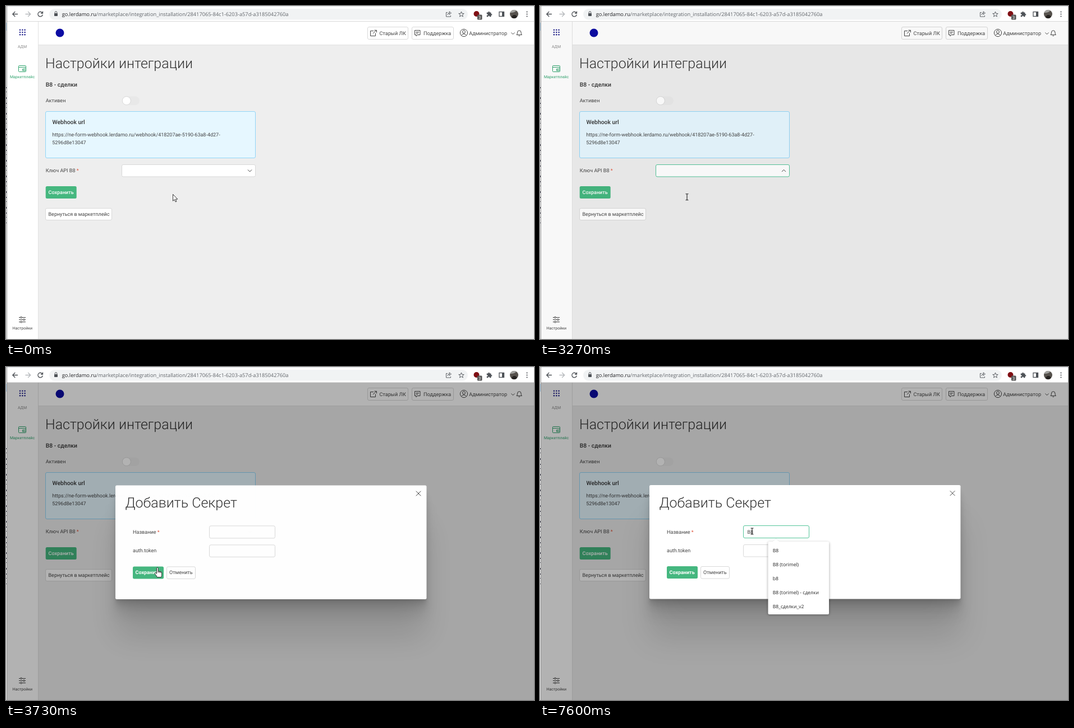
Write an HTML page that moves like this. It is 941 px wide and 595 px high and loops after 8000 ms.

```html
<!DOCTYPE html>
<html lang="ru">
<head>
<meta charset="utf-8">
<title>Настройки интеграции</title>
<style>
html, body { margin: 0; width: 100%; height: 100%; overflow: hidden; background: #fff; }
svg { display: block; width: 941px; height: 595px; font: 9px Roboto, sans-serif; text-rendering: geometricPrecision; }
text { fill: #444; }
.line { fill: none; stroke: #444; stroke-width: 1; }
.chrome { fill: none; stroke: #4d5156; stroke-width: 1.3; }
.box { fill: #fff; stroke: #d9d9d9; }
.head { font-size: 9.15px; }
.label { font-size: 9.1px; }
.title { font-size: 25px; font-weight: 300; fill: #333; }
.sub { font-size: 10.4px; font-weight: 500; fill: #333; }
.tiny { font-size: 7px; text-anchor: middle; }
.ui { font-family: "Open Sans", "Noto Sans", sans-serif; }
.url { font-size: 9.26px; }
.hint { font-size: 8.55px; fill: #222; }
.green { fill: #45b77f; }
.white { fill: #fff; font-weight: 500; }
.star { fill: #e0553c; }
</style>
</head>
<body>
<svg viewBox="0 0 941 595">
  <!-- page -->
  <rect x="2" y="28" width="939" height="567" fill="#eee"/>
  <rect x="2" y="28" width="55" height="567" fill="#fff"/>
  <rect x="57" y="28" width="884" height="41" fill="#fff"/>
  <path d="M57.5 28V595M57 69.5H941" stroke="#e2e2e2" fill="none"/>

  <g id="grid" fill="#23238e"></g>
  <text class="tiny" x="29" y="75" style="fill:#888">АДМ</text>
  <g fill="none" stroke="#2fa36d">
    <rect x="22.5" y="106.5" width="13" height="11" rx="1"/>
    <path d="M22.5 109.5h13M29.5 112.5h6v3h-6zM31 114h1.5"/>
  </g>
  <text class="tiny" x="29" y="129" style="fill:#2fa36d">Маркетплейс</text>
  <path class="line" d="M23 556.5h12M23 560.5h12M23 564.5h12"/>
  <g fill="#fff" stroke="#444">
    <circle cx="27" cy="556.5" r="1.4"/><circle cx="32" cy="560.5" r="1.4"/><circle cx="27" cy="564.5" r="1.4"/>
  </g>
  <text class="tiny" x="29.3" y="578">Настройки</text>

  <circle cx="96" cy="48" r="7.5" fill="#0c0ca3"/>
  <rect class="box" x="644.5" y="37.5" width="72" height="22" rx="2.5"/>
  <path class="line" d="M655 44.5h-5.5v9h9v-5M654 49l6-5.5M656.5 43.3h4v4"/>
  <text class="head" x="665.5" y="52">Старый ЛК</text>
  <rect class="box" x="723.5" y="37.5" width="74" height="22" rx="2.5"/>
  <path class="line" d="M728.5 43.5h9.5v8h-5l-2 2.3v-2.3h-2.5zM730.5 46.5h5.5M730.5 48.8h4"/>
  <text class="head" x="744" y="52">Поддержка</text>
  <circle class="line" cx="816" cy="48" r="6.6"/>
  <circle class="line" cx="816" cy="46.2" r="2.5"/>
  <path class="line" d="M811.5 52.7q1.2-2.8 4.5-2.8t4.5 2.8"/>
  <text class="head" x="825.3" y="52">Администратор</text>
  <path class="line" d="M900.5 47.5l3 3 3-3M910 51.5h9.4q-1.5-1-1.5-4.5a3.2 3.2 0 0 0-6.4 0q0 3.5-1.5 4.5M913.5 53.3h2.4"/>

  <text class="title" x="70" y="111">Настройки интеграции</text>
  <text class="sub" x="70.7" y="143.5">B8 - сделки</text>
  <text class="label" x="70.7" y="172">Активен</text>
  <rect x="207" y="161.5" width="31" height="15.5" rx="7.7" fill="#e8e8e8"/>
  <circle cx="214.8" cy="169.2" r="7.5" fill="#fff" stroke="#d2d2d2" stroke-width=".8"/>
  <rect x="70.5" y="188.5" width="374" height="83" rx="2.5" fill="#e6f7ff" stroke="#91d5f8"/>
  <text class="sub" x="82.5" y="211">Webhook url</text>
  <text x="82.2" y="233">https://ne-form-webhook.lerdamo.ru/webhook/418207ae-5190-63a8-4d27-</text>
  <text x="82.2" y="247">5296d8e13047</text>
  <text class="label" x="70.7" y="297">Ключ API B8 <tspan class="star">*</tspan></text>
  <rect id="select" class="box" x="206.5" y="283.5" width="238" height="21.5" rx="2.5"/>
  <path id="chevron" class="line" d="M-3.5-1.8L0 1.8 3.5-1.8"/>
  <rect class="green" x="70.7" y="322" width="55" height="22" rx="2.5"/>
  <text class="white" x="75.5" y="336.3">Сохранить</text>
  <rect class="box" x="70.5" y="361.5" width="118" height="21" rx="2.5"/>
  <text x="75.5" y="375.3">Вернуться в маркетплейс</text>

  <g id="options">
    <rect x="207.5" y="308" width="236.5" height="137" rx="2.5" fill="#fff" stroke="#ddd" stroke-width=".7"/>
    <rect x="208" y="330" width="235.5" height="22" fill="#f3f3f3"/>
    <text x="215" y="344.3">Добавить</text>
  </g>

  <rect id="shade" x="2" y="28" width="939" height="567"/>

  <g id="modal">
    <g id="shadows"></g>
    <rect x="195" y="211" width="554.5" height="203.5" rx="2.5" fill="#fff"/>
    <path class="line" d="M730.8 221.3l8.6 8.6M739.4 221.3l-8.6 8.6"/>
    <text class="title" x="212.5" y="250.5">Добавить Секрет</text>
    <text class="label" x="226" y="297.5">Название <tspan class="star">*</tspan></text>
    <rect id="field" class="box" x="362.5" y="283.5" width="117" height="22" rx="2.5"/>
    <text x="226" y="331">auth.token</text>
    <rect class="box" x="362.5" y="317.5" width="117" height="21.5" rx="2.5"/>
    <rect class="green" x="226" y="356" width="55" height="22" rx="2.5"/>
    <text class="white" x="230.5" y="370" style="font-weight:700">Сохранить</text>
    <rect class="box" x="286.5" y="356.5" width="51" height="21.5" rx="2.5"/>
    <text x="291" y="370">Отменить</text>
    <text id="typed" x="369.5" y="297.7"></text>
    <rect id="caret" y="289" width="1" height="11" fill="#333"/>
  </g>

  <g id="hints">
    <rect id="hintShadow" x="406" y="313" rx="3" fill="#000" opacity=".3" style="filter:blur(2px)"/>
    <path d="M413.5 312.5l7-6 7 6" fill="#fff" stroke="#e4e4e4" stroke-width=".7"/>
    <rect id="hintBox" x="406.5" y="312" rx="2" fill="#fff"/>
    <g id="hintList" class="ui"></g>
  </g>

  <!-- browser bar -->
  <rect width="941" height="28" fill="#fff"/>
  <path d="M0 .5H941" stroke="#dee1e6"/>
  <path d="M0 27.5H941" stroke="#d8d8d8"/>
  <rect x="77" y="5" width="746" height="19.5" rx="9.7" fill="#f1f3f4"/>
  <path class="chrome" d="M21 14.5h-9M16.3 10l-4.5 4.5 4.5 4.5"/>
  <path class="chrome" d="M34.5 14.5h9M39.2 10l4.5 4.5-4.5 4.5" style="stroke:#b5b8bb"/>
  <path class="chrome" d="M64.8 12.2a4.3 4.3 0 1 0 .6 3.3M65.5 9.5v3.5h-3.5"/>
  <rect x="86" y="13" width="6" height="5" rx=".7" fill="#4d5156"/>
  <path class="chrome" d="M87.2 13v-1.5a1.8 1.8 0 0 1 3.6 0V13" style="stroke-width:1"/>
  <text class="ui url" x="99.7" y="18" style="fill:#62666b"><tspan fill="#202124">go.lerdamo.ru</tspan>/marketplace/integration_installation/28417065-84c1-6203-a57d-a3185042760a</text>
  <path class="chrome" d="M787 11.5h-2.5v7.5h8v-2M786.8 16q.3-3.5 4-3.5M790 9.8l3.5 2.8-3.5 2.8z" style="stroke-width:.9"/>
  <path id="fav" class="chrome" style="stroke-width:.9"/>
  <circle cx="838.5" cy="14" r="5" fill="#800f14"/>
  <rect x="840" y="15.5" width="8.5" height="9" rx="1.5" fill="#555"/>
  <text x="844.2" y="22.7" text-anchor="middle" style="font-size:7.5px;fill:#fff">3</text>
  <path transform="translate(855.8 9.2) scale(.46)" fill="#4d5156" d="M20.5 11H19V7c0-1.1-.9-2-2-2h-4V3.5a2.5 2.5 0 0 0-5 0V5H4c-1.1 0-2 .9-2 2v3.8h1.5a2.7 2.7 0 0 1 0 5.4H2V20c0 1.1.9 2 2 2h3.8v-1.5a2.7 2.7 0 0 1 5.4 0V22H17c1.1 0 2-.9 2-2v-4h1.5a2.5 2.5 0 0 0 0-5z"/>
  <rect class="chrome" x="879" y="10.5" width="8.5" height="8"/>
  <rect x="884" y="10.5" width="4" height="8" fill="#4d5156"/>
  <circle cx="905.5" cy="14.5" r="7.5" fill="#56514c"/>
  <path d="M898.4 12a7.5 7.5 0 0 1 11-4q-3 4.5-11 4z" fill="#a3a3a0"/>
  <path d="M901 20.5q1-4.5 5-4.5t4.5 4a7.5 7.5 0 0 1-9.5 .5z" fill="#24211f"/>
  <g fill="#4d5156"><circle cx="928.5" cy="10.5" r="1.1"/><circle cx="928.5" cy="14.5" r="1.1"/><circle cx="928.5" cy="18.5" r="1.1"/></g>

  <!-- window edge -->
  <rect width="2" height="595" fill="#fff"/>
  <rect y="30" width="1" height="14" fill="#b9dcf5"/>
  <path d="M.5 145V388" stroke="#445" stroke-dasharray="2 6 1 9 3 7"/>
  <path d="M1.5 0V595" stroke="#8f8f8f"/>

  <g id="cursor">
    <path id="arrow" d="M.5.5V12.3l2.7-2.5 1.9 4.2 1.9-.9-1.9-4h3.7z" fill="#fff" stroke="#222" stroke-width=".9"/>
    <path id="hand" transform="translate(-.3 .3) scale(1 1.08)" d="M-1.2 9V1.2a1.3 1.3 0 0 1 2.6 0V6l5 1q1.5.4 1.5 2v3q0 2-1 4H-.3q-1-2.5-4-5.5-.7-1.8 1-1.8 1 .2 2.1 1.5zM1.4 6v2.5M3.7 6.5v2.3M6 7v2" fill="#fff" stroke="#222" stroke-width=".9"/>
    <path id="beam" d="M-2.5-5.5H-.7L0-5 .7-5.5H2.5M0-5V5M-2.5 5.5H-.7L0 5 .7 5.5H2.5" fill="none" stroke="#222" stroke-width="1.1"/>
  </g>
</svg>
<script>
const LOOP = 8000;
const $ = id => document.getElementById(id);
const set = (id, attrs) => { for (const k in attrs) $(id).setAttribute(k, attrs[k]); };
const show = (id, on) => { $(id).style.display = on ? '' : 'none'; };
const clamp = v => Math.min(1, Math.max(0, v));
const mix = (a, b, p) => a + (b - a) * p;

// cubic-bezier(.25, .1, .25, 1)
function ease(x) {
  const curve = (a, b, s) => 3 * a * s * (1 - s) ** 2 + 3 * b * s * s * (1 - s) + s ** 3;
  let lo = 0, hi = 1;
  for (let i = 0; i < 20; i++) {
    const mid = (lo + hi) / 2;
    if (curve(.25, .25, mid) < x) lo = mid; else hi = mid;
  }
  return curve(.1, 1, lo);
}
const ramp = (t, from, len) => {
  const p = clamp((t - from) / len);
  return p === 0 || p === 1 ? p : ease(p);
};
const green = p => `rgb(${mix(217, 84, p)},${mix(217, 196, p)},${mix(217, 153, p)})`;

// time, x, y of the pointer's hot spot
const path = [
  [0, 297, 336], [400, 297, 336], [1200, 340, 294], [1270, 340, 294],
  [1600, 346, 296], [1930, 346, 296], [2930, 262, 341.3], [3530, 262, 341.3],
  [3730, 270, 358], [4400, 378, 293.5], [LOOP, 378, 293.5]
];
function pointer(t) {
  const i = path.findIndex(k => k[0] > t);
  const [t0, x0, y0] = path[i - 1], [t1, x1, y1] = path[i];
  const p = (t - t0) / (t1 - t0), s = p * p * (3 - 2 * p);
  return [mix(x0, x1, s), mix(y0, y1, s)];
}
function pointerKind(t) {
  if (t < 2250) return 'arrow';
  if (t < 3200) return 'hand';
  if (t < 3335) return 'beam';
  if (t < 3870) return 'hand';
  return t < 4300 ? 'arrow' : 'beam';
}

const matches = ['B8', 'B8 (torimel)', 'b8', 'B8 (torimel) - сделки', 'B8_сделки_v2'];
const lists = {
  none: { width: 0, items: [] },
  all: { width: 149.5, items: ['vesnalugorenkova@namil.com', 'Тест_опр', 'Аксинья', 'call to visit', 'Zont4lark', 'Ringlomar_out'] },
  first: { width: 108.5, items: [...matches, 'basic'] },
  both: { width: 108.5, items: matches }
};
let shown;
function showHints(name) {
  if (name === shown) return;
  shown = name;
  const { width, items } = lists[name];
  const height = items.length * 25 + 5;
  show('hints', items.length);
  set('hintBox', { width, height });
  set('hintShadow', { width: width + 1, height });
  $('hintList').innerHTML = items.map((s, i) => `<text class="hint" x="414.7" y="${331 + i * 25}">${s}</text>`).join('');
}

function build() {
  let dots = '';
  for (let i = 0; i < 9; i++) {
    dots += `<circle cx="${25 + i % 3 * 4.3}" cy="${42.7 + Math.floor(i / 3) * 4.3}" r="1.25"/>`;
  }
  $('grid').innerHTML = dots;

  const scale = .6923;
  const layers = [[100, 80, .12], [41.8, 33.4, .086], [22.3, 17.9, .072], [12.5, 10, .06], [6.7, 5.3, .048], [2.8, 2.2, .034]];
  $('shadows').innerHTML = layers.map(([dy, blur, alpha]) =>
    `<rect x="195" y="${211 + dy * scale}" width="554.5" height="203.5" rx="2.5" opacity="${alpha}" style="filter:blur(${blur * scale / 2}px)"/>`).join('');

  let d = '';
  for (let i = 0; i < 10; i++) {
    const r = i % 2 ? 2.1 : 5, a = i * Math.PI / 5;
    d += `${i ? 'L' : 'M'}${811.5 + r * Math.sin(a)} ${15 - r * Math.cos(a)}`;
  }
  set('fav', { d: d + 'Z' });
}

function draw(t) {
  const hover = ramp(t, 850, 200) * (1 - ramp(t, 3275, 120));
  $('select').style.stroke = green(hover);
  const flip = ramp(t, 1870, 200) * (1 - ramp(t, 3275, 120));
  set('chevron', { transform: `translate(434.5 294.3) scale(1 ${1 - 2 * flip})` });

  const open = ramp(t, 1840, 200) * (1 - ramp(t, 3070, 130));
  show('options', open > 0);
  set('options', { opacity: open, transform: `translate(0 ${308 * (1 - open)}) scale(1 ${open})` });

  set('shade', { opacity: .3 * ramp(t, 3256, 150) });

  const rise = ramp(t, 3372, 400);
  show('modal', rise > 0);
  set('modal', { opacity: rise, transform: `translate(0 ${69.2 * (1 - rise)})` });

  $('field').style.stroke = green(ramp(t, 4440, 150));
  const typed = t < 6670 ? '' : t < 7000 ? 'B' : 'B8';
  $('typed').textContent = typed;
  set('caret', { x: [369, 375, 380][typed.length] });
  show('caret', t >= 4470 && t < 5070 || t >= 5600 && t < 6130 || t >= 6670 && t < 7600);
  showHints(t < 4530 ? 'none' : t < 6800 ? 'all' : t < 7070 ? 'first' : 'both');

  const [x, y] = pointer(t), kind = pointerKind(t);
  set('cursor', { transform: `translate(${x} ${y})` });
  for (const k of ['arrow', 'hand', 'beam']) show(k, k === kind);
}

build();
const start = performance.now();
function tick() {
  draw((performance.now() - start) % LOOP);
  requestAnimationFrame(tick);
}
tick();
</script>
</body>
</html>
```
